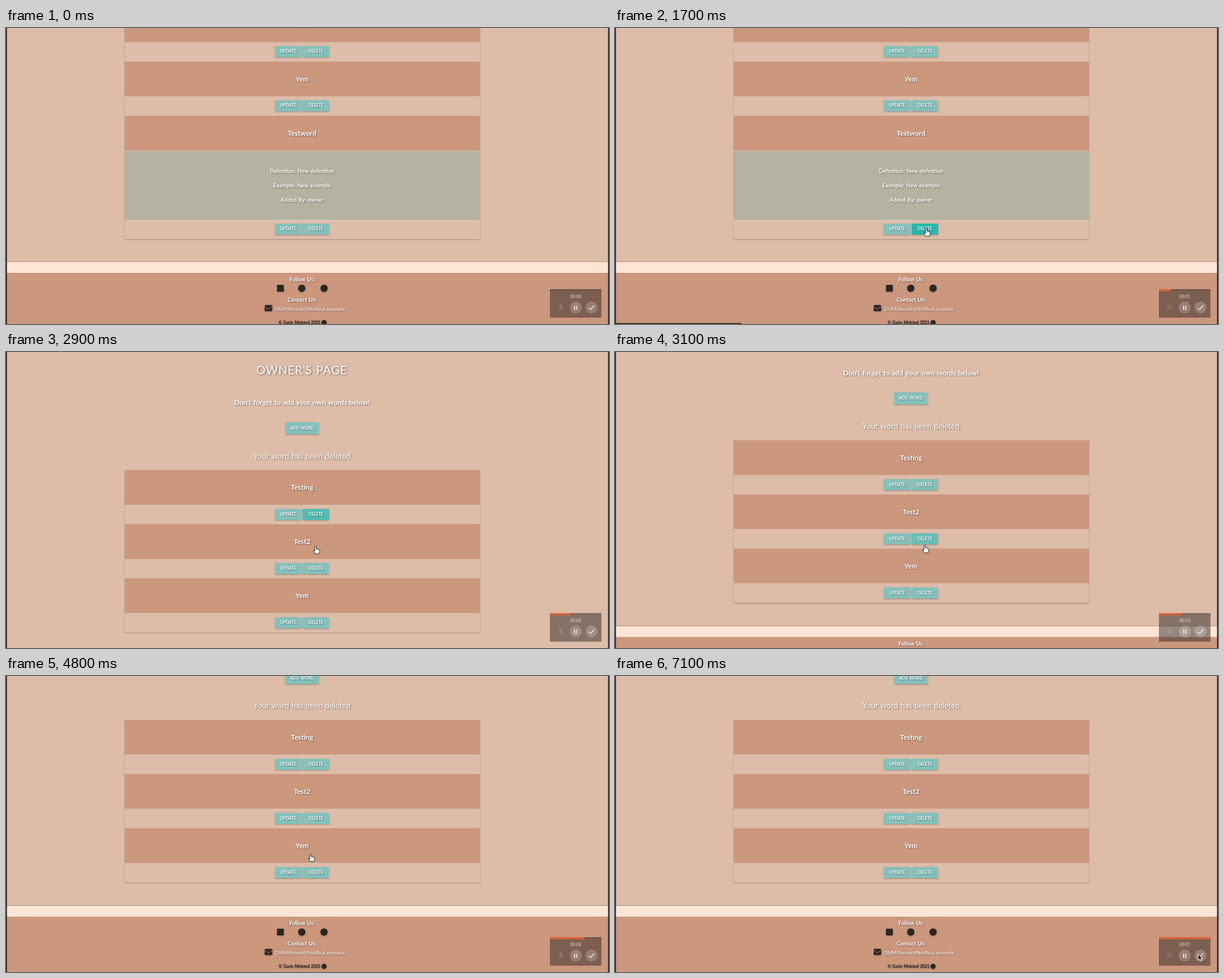
Write an HTML page with a canvas that moves like this. It is 1000 px wide and 492 px high and loops after 7.2 s.

```html
<!DOCTYPE html>
<html lang="en">
<head>
<meta charset="utf-8">
<title>Word list</title>
<style>
  html, body { margin: 0; height: 100%; overflow: hidden; background: #ddbca8; }
  canvas { display: block; width: 100vw; height: 100vh; }
</style>
</head>
<body>
<canvas id="stage" width="1000" height="492"></canvas>
<script>
const ctx = document.getElementById('stage').getContext('2d');
const LOOP = 7200, PAGE_SWITCH = 2100, MID = 491;
const SAND = '#ddbca8', CLAY = '#cb977d', CREAM = '#ffe5d6', INK = '#2a2523';
const CARD = { x: 197, w: 589, header: 58, row: 90 };

// Keyframes: [time, values...]
const scrollKeys = [[2500, 0], [2600, 20], [2750, 30], [2900, 91], [3400, 214.5]];
const pointerKeys = [
  [400, 780, 492], [1200, 516, 333], [2750, 516, 333], [2900, 513.5, 322.5],
  [3400, 514, 318], [4300, 514, 318], [4900, 503.5, 291], [6000, 503.5, 291], [6800, 967, 462]
];

function track(keys, t) {
  if (t <= keys[0][0]) return keys[0].slice(1);
  for (let i = 1; i < keys.length; i++) {
    const a = keys[i - 1], b = keys[i];
    if (t <= b[0]) {
      const p = (t - a[0]) / (b[0] - a[0]);
      return a.slice(1).map((v, k) => v + (b[k + 1] - v) * p);
    }
  }
  return keys[keys.length - 1].slice(1);
}

function rect(x, y, w, h, color) {
  ctx.fillStyle = color;
  ctx.fillRect(x, y, w, h);
}

function disc(x, y, r, color) {
  ctx.fillStyle = color;
  ctx.beginPath();
  ctx.arc(x, y, r, 0, Math.PI * 2);
  ctx.fill();
}

function shaded(dy, blur, alpha, draw, dx = 0) {
  ctx.save();
  ctx.shadowColor = `rgba(0,0,0,${alpha})`;
  ctx.shadowOffsetX = dx;
  ctx.shadowOffsetY = dy;
  ctx.shadowBlur = blur;
  draw();
  ctx.restore();
}

function text(str, x, y, size, { weight = 700, color = '#fff', align = 'center', depth = 1, spacing = 0 } = {}) {
  shaded(depth, depth * 2, depth ? .45 : 0, () => {
    ctx.font = `${weight} ${size}px Lato, sans-serif`;
    ctx.letterSpacing = spacing + 'px';
    ctx.wordSpacing = size * .06 + 'px';
    ctx.textAlign = align;
    ctx.textBaseline = 'middle';
    ctx.fillStyle = color;
    ctx.fillText(str, x, y + .5);
  }, depth);
}

function line(points, color, width) {
  ctx.strokeStyle = color;
  ctx.lineWidth = width;
  ctx.beginPath();
  points.forEach(([x, y]) => ctx.lineTo(x, y));
  ctx.stroke();
}

function button(label, x, y, w, h, hover = 0) {
  const mix = (a, b) => Math.round(a + (b - a) * hover);
  shaded(1, 2, .28, () => {
    ctx.fillStyle = `rgb(${mix(132, 38)},${mix(193, 186)},${mix(188, 172)})`;
    ctx.beginPath();
    ctx.roundRect(x, y, w, h, 1.5);
    ctx.fill();
  });
  text(label, x + w / 2, y + h / 2 - .5, 6.8);
}

// Top of each delete button at time t, for the page shown then
function deleteTops(t) {
  if (t < PAGE_SWITCH) return [30, 120, 325];
  const top = 287.5 - track(scrollKeys, t)[0];
  return [0, 1, 2].map(i => top + i * CARD.row + 64.5);
}

function isOver(t, index) {
  if (t < pointerKeys[0][0]) return false;
  const [x, y] = track(pointerKeys, t), top = deleteTops(t)[index];
  return x > 492 && x < 536 && y > top && y < top + 18.5;
}

// The hover colour fades over 300 ms
function hoverAmount(t, index) {
  const from = t < PAGE_SWITCH ? 0 : PAGE_SWITCH;
  let hits = 0;
  for (let i = 0; i < 30; i++) {
    const at = t - i * 10;
    if (at >= from && isOver(at, index)) hits++;
  }
  return hits / 30;
}

function cardFrame(top, bottom) {
  shaded(1, 2, .28, () => rect(CARD.x, top, CARD.w, bottom - top, SAND));
}

function wordHeader(word, y) {
  rect(CARD.x, y, CARD.w, CARD.header, CLAY);
  rect(CARD.x, y + CARD.header - .3, CARD.w, .7, '#dcc5b9');
  text(word, MID, y + 29, 11.5);
}

function actions(y, hover) {
  button('UPDATE', 446, y, 44, 18.5);
  button('DELETE', 492, y, 44, 18.5, hover);
}

function footer(y) {
  shaded(0, 2, .5, () => rect(0, y, 1000, 18, CREAM));
  rect(0, y + 18, 1000, 492, CLAY);
  text('Follow Us:', MID, y + 29, 9);
  shaded(1, 2, .4, () => {
    rect(449.5, y + 38, 11, 11, INK);
    disc(490.5, y + 43.5, 6, INK);
    disc(527.5, y + 43.5, 6, INK);
    ctx.fillStyle = INK;
    ctx.beginPath();
    ctx.roundRect(429, y + 71.5, 12.5, 10, 1.5);
    ctx.fill();
    disc(527.5, y + 100.5, 4.2, INK);
  });
  line([[429, y + 74], [435.2, y + 78.5], [441.5, y + 74]], CLAY, .8);
  text('Contact Us:', MID, y + 62.5, 9.2);
  text('OldMillbrook@NotReal.example', 446, y + 78, 8, { weight: 400, align: 'left', spacing: .15 });
  text('© Garin Melsted 2021', 452, y + 100.5, 6.9, { color: INK, align: 'left' });
}

function firstPage(t) {
  cardFrame(-40, 351);
  wordHeader('Test2', -34);
  wordHeader('Yem', 56);
  wordHeader('Testword', 146);
  rect(CARD.x, 205, CARD.w, 114, '#b5b2a1');
  rect(CARD.x, 319, CARD.w, .8, '#d8d0c4');
  ['Definition: New definition', 'Example: New example', 'Added By: owner']
    .forEach((str, i) => text(str, MID, 237.5 + i * 24.2, 9.1));
  deleteTops(t).forEach((y, i) => actions(y, hoverAmount(t, i)));
  footer(389);
}

function secondPage(t) {
  const scroll = track(scrollKeys, t)[0], top = 287.5;
  ctx.save();
  ctx.translate(0, -scroll);
  shaded(0, 1, .2, () => rect(0, 32, 1000, 50, CREAM));
  shaded(.5, 2, .25, () => rect(0, 0, 1000, 32, CLAY));
  [['HOME', 818], ['DICTIONARY', 857], ['PROFILE', 918], ['LOG OUT', 965]]
    .forEach(([str, x]) => text(str, x, 14, 7.4, { align: 'left' }));
  text("OWNER'S PAGE", 490.5, 121.5, 19.5, { weight: 400, depth: 1.5, spacing: .6 });
  text("Don't forget to add your own words below!", MID, 175.5, 11.5);
  button('ADD WORD', 463, 208, 56, 20);
  text('Your word has been deleted', MID, 264.5, 12.9, { weight: 400 });
  cardFrame(top, top + CARD.row * 3);
  ['Testing', 'Test2', 'Yem'].forEach((word, i) => {
    const y = top + i * CARD.row;
    wordHeader(word, y);
    actions(y + 64.5, hoverAmount(t, i));
  });
  footer(596.5);
  ctx.restore();
}

function recorder(t) {
  rect(902, 434, 85.5, 47.5, 'rgba(48,40,38,.5)');
  rect(902, 434, 85.5, 3.5, 'rgba(0,0,0,.05)');
  rect(902, 434, Math.min(85.5, t * .012), 3.5, '#d5633c');
  text('00:0' + Math.floor(t / 1000), 945, 446.5, 7, { weight: 400, color: '#e8ddd7', depth: 0 });
  disc(945, 464.5, 10, 'rgba(255,255,255,.2)');
  disc(971, 464.5, 10, 'rgba(255,255,255,.2)');
  const icon = 'rgba(255,255,255,.85)', faint = 'rgba(255,255,255,.15)';
  rect(942.3, 461, 1.5, 7.5, icon);
  rect(945.8, 461, 1.5, 7.5, icon);
  line([[966.5, 465], [969.5, 468], [975.5, 461]], icon, 1.2);
  rect(918.5, 459.5, 3, 6, faint);
  line([[916, 464], [917.5, 467], [922.5, 467], [924, 464]], faint, 1);
  line([[915, 459], [926, 470]], faint, 1);
}

const handPath = new Path2D('M-1.3 1Q0-.8 1.3 1V5Q2.6 4 3.5 5.4Q4.8 4.8 5.4 6.2Q6.8 6 6.8 7.6V9.5L5.3 13.2H-.5L-3.8 8.6Q-3.9 6.6-1.3 8.4Z');
const arrowPath = new Path2D('M0 0V10.5L2.4 8.4L4 12L5.7 11.2L4.1 7.7H7.3Z');

function pointer(t) {
  if (t < pointerKeys[0][0]) return;
  ctx.save();
  ctx.translate(...track(pointerKeys, t));
  const isHand = t > 1100 && t < 6150;
  const shape = isHand ? handPath : arrowPath;
  ctx.lineJoin = 'round';
  ctx.lineWidth = 1;
  ctx.strokeStyle = isHand ? '#222' : '#fff';
  ctx.fillStyle = isHand ? '#fff' : '#111';
  ctx.fill(shape);
  ctx.stroke(shape);
  ctx.restore();
}

function draw(now) {
  const t = now % LOOP;
  rect(0, 0, 1000, 492, SAND);
  (t < PAGE_SWITCH ? firstPage : secondPage)(t);
  rect(0, 0, 1.5, 492, '#211b19');
  rect(998.5, 0, 1.5, 492, '#211b19');
  if ([0, 1, 2].some(i => isOver(t, i))) rect(0, 490.5, 210, 1.5, '#2c2522');
  recorder(t);
  pointer(t);
}

const start = performance.now();
function tick() {
  draw(performance.now() - start);
  requestAnimationFrame(tick);
}
tick();
</script>
</body>
</html>
```
